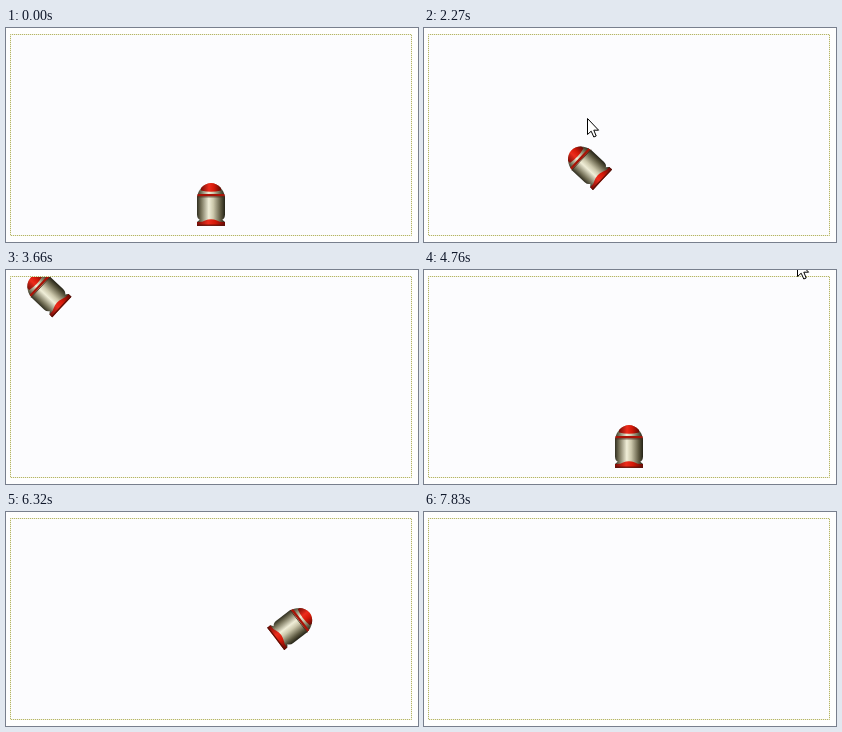
Write an HTML page that moves like this. It is 412 by 214 pixels and loops after 8000 ms.

```html
<!DOCTYPE html>
<html lang="en">
<head>
<meta charset="utf-8">
<title>Rocket launch</title>
<style>
  html, body { margin: 0; width: 100%; height: 100%; overflow: hidden; background: #fefefe; }
  svg { display: block; width: 412px; height: 214px; }
</style>
</head>
<body>
<svg viewBox="0 0 412 214">
  <defs>
    <linearGradient id="metal">
      <stop offset="0" stop-color="#302e20"/>
      <stop offset=".15" stop-color="#77735a"/>
      <stop offset=".42" stop-color="#f0eed8"/>
      <stop offset=".58" stop-color="#ccc8ac"/>
      <stop offset=".85" stop-color="#5c5840"/>
      <stop offset="1" stop-color="#242216"/>
    </linearGradient>
    <linearGradient id="red">
      <stop offset="0" stop-color="#780c06"/>
      <stop offset=".4" stop-color="#ec2c1c"/>
      <stop offset=".65" stop-color="#d41808"/>
      <stop offset="1" stop-color="#640a04"/>
    </linearGradient>
    <clipPath id="stage"><rect x="5" y="7" width="400" height="200"/></clipPath>
    <clipPath id="dome"><path d="M-14-7C-13-15-7-21.5 0-21.5S13-15 14-7Z"/></clipPath>
  </defs>

  <rect x="4.5" y="6.5" width="401" height="201" fill="#fcfcfe" stroke="#f0f0d8"/>
  <rect x="4.5" y="6.5" width="401" height="201" fill="none" stroke="#b4b468" stroke-dasharray="1" stroke-dashoffset=".5"/>

  <g clip-path="url(#stage)">
    <g id="rocket">
      <g clip-path="url(#dome)">
        <rect x="-14" y="-22" width="28" height="16" fill="url(#metal)"/>
        <path d="M-10-22H10V-14Q0-11.5-10-14Z" fill="url(#red)"/>
        <path d="M-14-10.5H14V-8H-14Z" fill="#a81408"/>
      </g>
      <path d="M-14-8H14V10Q14 14 11 15.5H-11Q-14 14-14 10Z" fill="url(#metal)"/>
      <path d="M-14-7.6H14" stroke="#4c2a1c" stroke-width=".8"/>
      <path d="M-11 15H11L14 17.5V21.3H-14V17.5Z" fill="url(#metal)"/>
      <path d="M-14 17.5Q-9 18-6 16Q0 13.5 6 16Q9 18 14 17.5V21.3H-14Z" fill="url(#red)"/>
      <path d="M-14 20.7H14" stroke="#5c1008" stroke-width="1.2"/>
    </g>
  </g>
  <path id="cursor" d="M.5.5V16.5L4.2 13.2 6.8 19 9.2 18 6.8 12.2H11.6Z" fill="#fff" stroke="#000"/>
</svg>

<script>
const LOOP = 8000, STEP = 40, RELOAD = 4460;
const HOME = { x: 205, y: 176.5 };

// speed in px per ms, turn in degrees from straight up
const flights = [
  { start: 1810, end: 4170, speed: 0.12, turn: -46.9 },
  { start: 5470, end: 7830, speed: 0.117, turn: 52.5 }
];

// a move ends at `at` and takes `take` ms; the cursor rests in between
const passes = [
  {
    start: 210, end: 3250, from: { x: 330, y: -15 },
    moves: [
      { at: 510, take: 300, x: 122, y: 100 },
      { at: 720, take: 50, x: 120, y: 105 },
      { at: 1090, take: 120, x: 124, y: 93 },
      { at: 1390, take: 40, x: 122, y: 98 },
      { at: 2910, take: 1060, x: 225, y: 79 },
      { at: 3250, take: 340, x: 330, y: -22 }
    ]
  },
  {
    start: 4760, end: 5470, from: { x: 374, y: -10 },
    moves: [
      { at: 5000, take: 240, x: 220, y: 60 },
      { at: 5310, take: 310, x: 281, y: 118 }
    ]
  }
];

const rocket = document.getElementById("rocket");
const cursor = document.getElementById("cursor");

function place(el, x, y, turn = 0) {
  el.setAttribute("transform", `translate(${x} ${y}) rotate(${turn})`);
}

function show(el, on) {
  el.setAttribute("visibility", on ? "visible" : "hidden");
}

function drawRocket(t) {
  const flight = flights.find(f => t >= f.start && t < f.end);
  const ready = t < flights[0].start || (t >= RELOAD && t < flights[1].start);
  show(rocket, flight || ready);
  if (!flight) return place(rocket, HOME.x, HOME.y);
  const steps = Math.floor((t - flight.start) / STEP) + 1;
  const way = steps * STEP * flight.speed;
  const angle = flight.turn * Math.PI / 180;
  place(rocket, HOME.x + way * Math.sin(angle), HOME.y - way * Math.cos(angle), flight.turn);
}

function drawCursor(t) {
  const pass = passes.find(p => t >= p.start && t < p.end);
  show(cursor, pass);
  if (!pass) return;
  let { x, y } = pass.from;
  for (const move of pass.moves) {
    const k = Math.min(1, Math.max(0, 1 - (move.at - t) / move.take));
    x += (move.x - x) * k;
    y += (move.y - y) * k;
  }
  place(cursor, Math.round(x), Math.round(y));
}

function draw() {
  const t = performance.now() % LOOP;
  drawRocket(t);
  drawCursor(t);
  requestAnimationFrame(draw);
}
draw();
</script>
</body>
</html>
```
